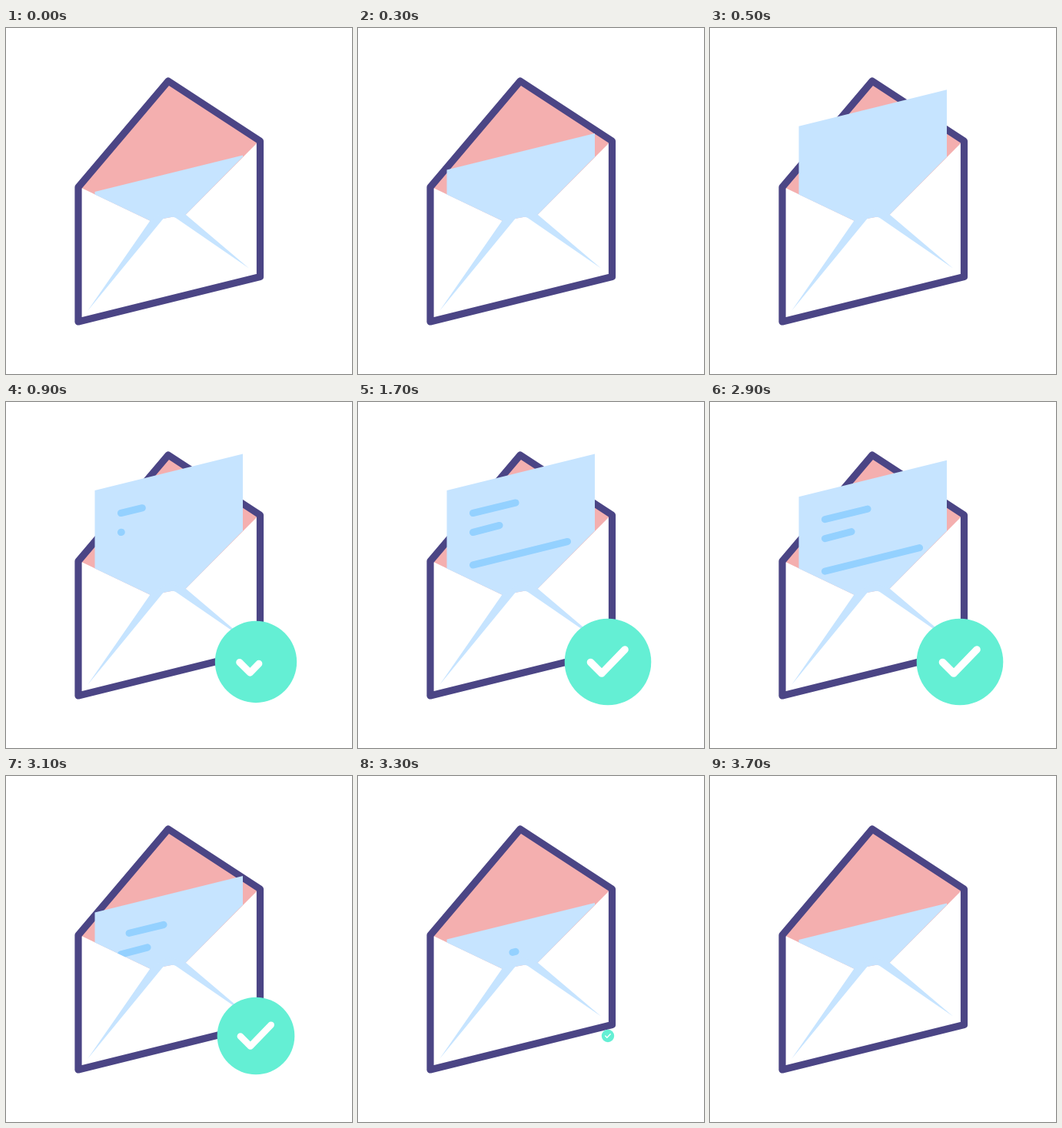
Recreate the animation shown at these times as an HTML page with a canvas. Size 450 by 450 pixels, loop 3.8 s.

```html
<!DOCTYPE html>
<html lang="en">
<head>
<meta charset="utf-8">
<title>Envelope</title>
<style>
html, body { margin: 0; width: 100%; height: 100%; overflow: hidden; background: #fff; }
canvas { display: block; width: 450px; height: 450px; }
</style>
</head>
<body>
<canvas id="stage" width="450" height="450"></canvas>
<script>
const ctx = document.getElementById('stage').getContext('2d');
const LOOP = 3800, STEP = 100;
const NAVY = '#4b4585', PINK = '#f4afaf', PAPER = '#c6e4ff',
      INK = '#94d1ff', MINT = '#64efd4', WHITE = '#fff';

const OUTLINE = [[94, 207], [211, 69], [330.5, 147], [330.5, 323.5], [94, 382]];
const POCKET = [[94, 206], [188, 251], [234, 242.5], [330, 146], [330, 323], [94, 382]];
const TICK = [[-22.5, 0.5], [-8, 15], [22, -16]];
const LINES = [
  { from: [149.5, 144.5], to: [205, 131], on: 700, off: 2976 },
  { from: [149.5, 169.5], to: [184, 160.5], on: 860, off: 3130 },
  { from: [149.5, 212], to: [272.5, 181.5], on: 1010, off: 3280 }
];

// Quadratic ease in and out, from 0 to 1
function ease(t, start, length) {
  const p = Math.min(1, Math.max(0, (t - start) / length));
  return p < 0.5 ? 2 * p * p : 1 - 2 * (1 - p) * (1 - p);
}

function trace(points) {
  ctx.beginPath();
  points.forEach(([x, y]) => ctx.lineTo(x, y));
}

function fill(points, color) {
  trace(points);
  ctx.closePath();
  ctx.fillStyle = color;
  ctx.fill();
}

function stroke(color, width) {
  ctx.strokeStyle = color;
  ctx.lineWidth = width;
  ctx.stroke();
}

const mix = (a, b, p) => [a[0] + (b[0] - a[0]) * p, a[1] + (b[1] - a[1]) * p];

function drawEnvelope() {
  fill(OUTLINE, PINK);
  fill(POCKET, WHITE);
  trace(OUTLINE);
  ctx.closePath();
  stroke(NAVY, 9.2);
}

function drawPaper(t) {
  const drop = 98 * (1 - ease(t, 90, 550) + ease(t, 2790, 540));
  const sheet = [[115.5, 115 + drop], [308, 67.5 + drop], [308, 167.5],
                 [234, 242.5], [188, 251], [115.5, 216.5]];
  fill(sheet, PAPER);
  ctx.save();
  ctx.clip();
  ctx.translate(0, drop);
  for (const { from, to, on, off } of LINES) {
    const head = ease(t, on, 400), tail = ease(t, off, 400);
    if (head <= tail) continue;
    trace([mix(from, to, tail), mix(from, to, head)]);
    stroke(INK, 9.2);
  }
  ctx.restore();
}

function drawFolds() {
  ctx.beginPath();
  ctx.moveTo(187.5, 250.5);
  ctx.lineTo(106, 368);
  ctx.lineTo(202, 251);
  ctx.quadraticCurveTo(206, 245.5, 212, 245);
  ctx.quadraticCurveTo(218, 244.5, 223, 248.5);
  ctx.lineTo(316, 312.5);
  ctx.lineTo(233.5, 242.5);
  ctx.lineTo(212, 235);
  ctx.closePath();
  ctx.fillStyle = PAPER;
  ctx.fill();
}

function drawBadge(t) {
  const size = ease(t, 600, 360) - ease(t, 3008, 400);
  if (size <= 0) return;
  ctx.save();
  ctx.translate(325, 338);
  ctx.scale(size, size);
  ctx.beginPath();
  ctx.arc(0, 0, 56.3, 0, Math.PI * 2);
  ctx.fillStyle = MINT;
  ctx.fill();

  const p = ease(t, 680, 400), bend = 0.322;
  if (p > 0) {
    const path = [TICK[0], mix(TICK[0], TICK[1], Math.min(1, p / bend))];
    if (p > bend) path.push(mix(TICK[1], TICK[2], (p - bend) / (1 - bend)));
    trace(path);
    stroke(WHITE, 9.6);
  }
  ctx.restore();
}

function draw(t) {
  ctx.fillStyle = WHITE;
  ctx.fillRect(0, 0, 450, 450);
  ctx.lineCap = ctx.lineJoin = 'round';
  drawEnvelope();
  drawPaper(t);
  drawFolds();
  drawBadge(t);
}

const begin = performance.now();
function tick() {
  const t = (performance.now() - begin) % LOOP;
  draw(Math.floor(t / STEP) * STEP);
  requestAnimationFrame(tick);
}
tick();
</script>
</body>
</html>
```
